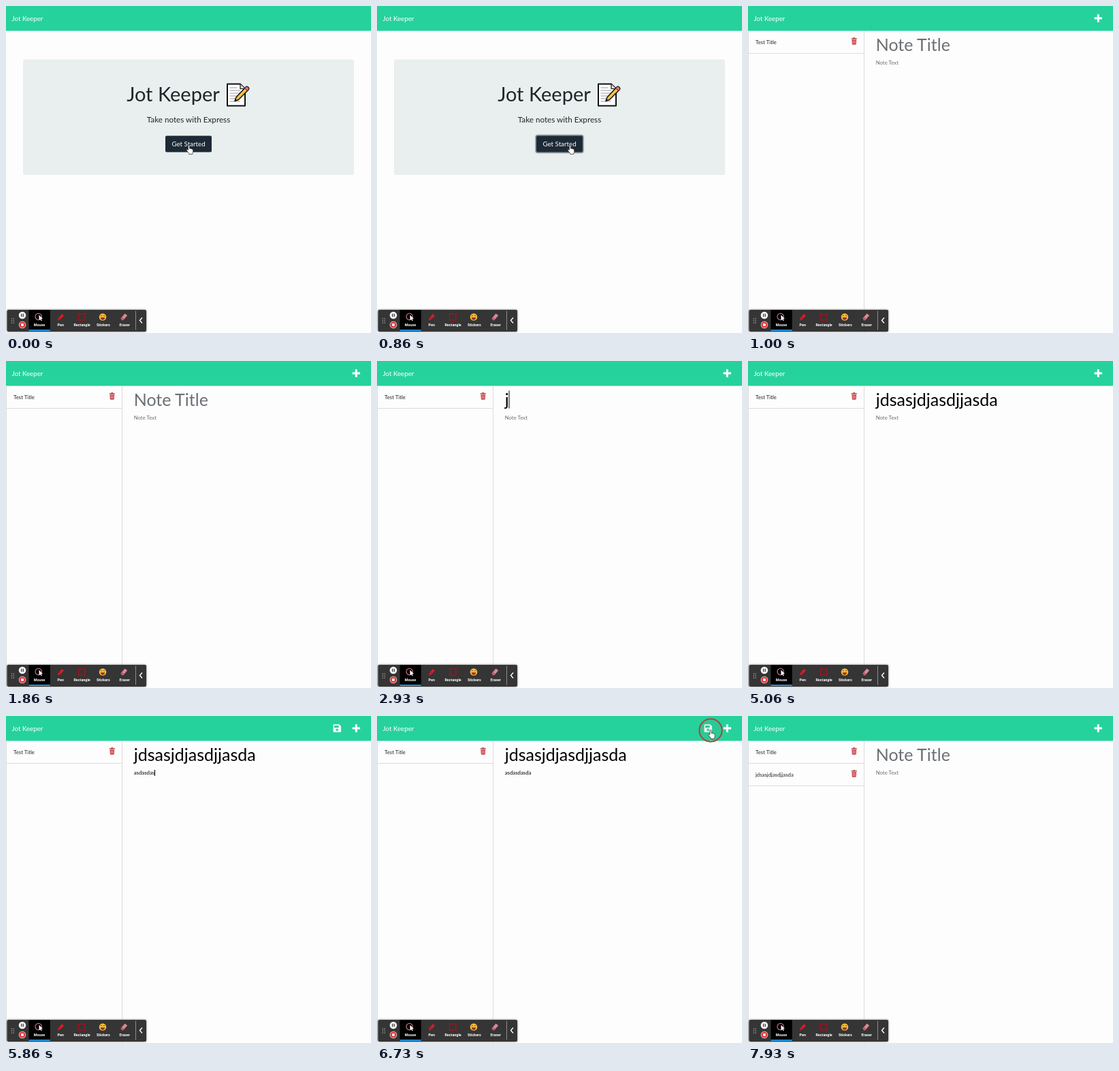
Recreate the animation shown at these times as an HTML page. Size 536x480 px, loop 8 s.

```html
<!DOCTYPE html>
<html lang="en">
<head>
<meta charset="utf-8">
<title>Jot Keeper</title>
<style>
  html, body { margin: 0; width: 100%; height: 100%; overflow: hidden; background: #fdfdfd; }
  svg { display: block; width: 536px; height: 480px; font-family: Lato, sans-serif; }
  .label { font: 700 5.4px Roboto, sans-serif; fill: #fff; text-anchor: middle; }
  .mid { text-anchor: middle; }
  .title { font-size: 25px; }
  .small { font-size: 7.8px; }
</style>
</head>
<body>
<svg viewBox="0 0 536 480">
  <defs>
    <filter id="shadow" x="-10%" y="-30%" width="120%" height="160%">
      <feDropShadow dx="0" dy="0" stdDeviation="1.5" flood-opacity=".55"/>
    </filter>
    <g id="trash" fill="#cb444a">
      <path d="M0 1.3h2.4l.6-1h2.2l.6 1h2.4v1.3h-8.2z" fill="#a8363e"/>
      <path d="M.7 3.2h6.8l-.4 6.6q0 .9-.9.9h-4.2q-.9 0-.9-.9z"/>
      <path d="M2.5 4.6v4.7M4.1 4.6v4.7M5.7 4.6v4.7" stroke="#f2c9cb" stroke-width=".6"/>
    </g>
  </defs>

  <rect width="536" height="480" fill="#fdfdfd"/>
  <rect width="536" height="36.5" fill="#26d29c"/>
  <text x="8.5" y="22" font-size="9.75" fill="#fff">Jot Keeper</text>

  <g id="home">
    <rect x="25" y="78.5" width="486" height="169.5" rx="2.5" fill="#e9eeee"/>
    <g fill="#212529" class="mid">
      <text x="245.5" y="140" font-size="29">Jot Keeper</text>
      <text x="268" y="171" font-size="11.7">Take notes with Express</text>
    </g>
    <g stroke="#111" stroke-linejoin="round">
      <path d="M325 114.500h19l7 7v25h-26z" fill="#fff" stroke-width="2"/>
      <path d="M344 114.500v7h7" fill="#ddd" stroke-width="1.2"/>
      <path d="M328.500 120h11M328.500 124h16M328.500 128h16M328.500 132h12M328.500 136h9M328.500 140h15" stroke="#999" stroke-width="1.1"/>
      <path d="M336 139.500l2-5.500 14-15q1.800-1.500 3.700.300t.300 3.700l-14.500 14.500z" fill="#f5c242" stroke-width="1.500"/>
      <path d="M351.500 119.500q2.200-2.300 4.200-.300t.300 3.800l-1.300 1.400-4.400-3.800z" fill="#e5707c" stroke-width=".8"/>
      <path d="M336 139.500l1-3 2 2z" fill="#222" stroke-width=".5"/>
    </g>
    <rect id="focus" x="233.200" y="189.700" width="69.600" height="25.600" rx="3" fill="none" stroke="#8d969f" stroke-width="2"/>
    <rect x="234" y="190.500" width="68" height="24" rx="2" fill="#1e2936"/>
    <text x="268" y="206" font-size="9.75" fill="#fff" class="mid">Get Started</text>
  </g>

  <g id="notes">
    <path d="M.5 37V480M170.500 37V480M0 69.500H170.500" stroke="#dcdcdc" fill="none"/>
    <text x="11" y="56" class="small" fill="#222">Test Title</text>
    <use href="#trash" x="151.700" y="46"/>
    <g id="saved">
      <path d="M0 102.500H170.500" stroke="#dcdcdc"/>
      <text x="11" y="89" class="small" fill="#222" id="savedTitle"></text>
      <use href="#trash" x="151.700" y="79"/>
    </g>
    <text id="noteTitle" class="title" x="187.700" y="66"></text>
    <text id="noteText" class="small" x="187.700" y="86"></text>
    <path id="caret" stroke="#000" stroke-width="1"/>
    <path d="M514.300 12.300v11.400M508.600 18h11.400" stroke="#fff" stroke-width="3"/>
    <g id="saveIcon">
      <path d="M481.700 12.300h7.500l2.800 2.800v7.500q0 1.200-1.200 1.200h-9.100q-1.200 0-1.200-1.200v-9.100q0-1.200 1.200-1.200z" fill="#f2fbf8"/>
      <path d="M482 14h6.500v3.200H482z" fill="#26d29c"/>
      <circle cx="486.200" cy="20.300" r="1.700" fill="#26d29c"/>
    </g>
  </g>

  <g id="toolbar">
    <rect x="1.500" y="446" width="204.500" height="32" rx="2" fill="#343434" filter="url(#shadow)"/>
    <path d="M8.500 458.500v8M11.300 458.500v8" stroke="#bbb" stroke-width="1.200" stroke-dasharray="1.200 1.800"/>
    <circle cx="24" cy="454" r="5.300" fill="#f5f5f5"/>
    <path d="M22.700 451.700v4.600M25.300 451.700v4.600" stroke="#333" stroke-width="1.200"/>
    <circle cx="24" cy="468" r="5.300" fill="#f5d5d5"/>
    <circle cx="24" cy="468" r="4.600" fill="#d93a3f"/>
    <rect x="22.200" y="466.200" width="3.600" height="3.600" fill="#fff"/>
    <rect x="33.500" y="446" width="31.300" height="31" fill="#000"/>
    <rect x="33.500" y="475" width="31.300" height="2" fill="#2196e8"/>
    <circle cx="47.700" cy="456" r="4.700" fill="none" stroke="#d98088" stroke-width="1.100"/>
    <path d="M48.500 453.500v8l1.900-1.700 1.200 2.500 1.200-.6-1.200-2.400h2.500z" fill="#fff"/>
    <path d="M76 461.500l1.200-4 5-5.500 2.800 2.500-5 5.500z" fill="#d91c2b"/>
    <path d="M78 457l3 2.700" stroke="#821018" stroke-width=".8"/>
    <rect x="106.700" y="452" width="9.200" height="9" fill="none" stroke="#b00d1c" stroke-width="1.300"/>
    <circle cx="142" cy="456.500" r="5.300" fill="#f4bd3c"/>
    <path d="M138.500 455q1.300-1.500 2.500 0M143 455q1.300-1.500 2.500 0" fill="none" stroke="#5b3613" stroke-width=".8"/>
    <path d="M138.700 457.300h6.600q-.6 3.500-3.300 3.500t-3.300-3.500z" fill="#9c2f1d"/>
    <path d="M168.500 458.500l6-7 3.700 2.800-6 7h-2z" fill="#dc8795"/>
    <path d="M168.500 458.500l1.700-2 3.700 2.900-1.700 1.900h-2z" fill="#b85f6e"/>
    <g id="labels"></g>
    <path d="M190.500 447.500v28" stroke="#999" stroke-width=".9"/>
    <path d="M200 457.500l-3.500 4 3.500 4" fill="none" stroke="#fff" stroke-width="1.400"/>
  </g>

  <circle id="ring" r="16.700" fill="#803c32" fill-opacity=".06" stroke="#a34b42" stroke-width="2"/>
  <path id="hand" fill="#fff" stroke="#222" stroke-width=".7" stroke-linejoin="round"
    d="M-1.100 .8q0-1.200 1.100-1.200t1.100 1.200v3.400q1.500-.5 1.900.4 1.400-.3 1.700.6 1.500 0 1.500 1.300v2.300q0 1.400-.9 2.500v1.200h-5v-1l-3.400-4.200q-.7-1 .2-1.500t1.800.7z"/>
  <path id="arrow" fill="#fff" stroke="#222" stroke-width=".7" d="M0 0v10l2.400-2 1.500 3.300 1.500-.7-1.500-3.200h3z"/>
</svg>
<script>
const LOOP = 8000;
const TITLE = "jdsasjdjasdjjasda";
const BODY = "asdasdasda";
const OPEN = 1000, SAVE = 6930;
const titleTyping = { start: 2820, step: 110 };
const bodyTyping = { start: 5160, step: 80 };

// Pointer stops: time, x, y
const pointerPath = [[200, 268.500, 205], [860, 283.500, 205], [6060, 440, 66], [6420, 490, 21], [6980, 490, 21], [7350, 470, 42]];
const clicks = [[260, 640], [2130, 2400], [6460, 6860]];

const $ = id => document.getElementById(id);
const within = (t, a, b) => t >= a && t < b;
const show = (id, on) => $(id).setAttribute("display", on ? "inline" : "none");
const place = (id, [x, y]) => $(id).setAttribute("transform", `translate(${x} ${y})`);

$("labels").innerHTML = ["Mouse", "Pen", "Rectangle", "Stickers", "Eraser"]
  .map((name, i) => `<text class="label" x="${49 + i * 31.3}" y="470">${name}</text>`).join("");
$("savedTitle").textContent = TITLE;

function typed(text, { start, step }, t) {
  return t < SAVE ? text.slice(0, Math.max(0, Math.floor((t - start) / step))) : "";
}

function setField(id, value, placeholder) {
  $(id).textContent = value || placeholder;
  $(id).setAttribute("fill", value ? "#000" : "#6b6f73");
}

function pointerAt(t) {
  const next = pointerPath.findIndex(stop => stop[0] > t);
  if (next === 0) return pointerPath[0].slice(1);
  if (next < 0) return pointerPath.at(-1).slice(1);
  const [t0, x0, y0] = pointerPath[next - 1];
  const [t1, x1, y1] = pointerPath[next];
  const p = (t - t0) / (t1 - t0);
  const ease = p * p * (3 - 2 * p);
  return [x0 + (x1 - x0) * ease, y0 + (y1 - y0) * ease];
}

function drawCaret(t, title, body) {
  const inTitle = within(t, 2400, 5000);
  const inBody = within(t, 5160, 6200);
  const blinkOn = !inTitle || t >= titleTyping.start || t < 2700;
  show("caret", (inTitle || inBody) && blinkOn);
  const field = $(inTitle ? "noteTitle" : "noteText");
  const hasText = inTitle ? title : body;
  const x = 188 + (hasText ? field.getComputedTextLength() : 0);
  $("caret").setAttribute("d", inTitle ? `M${x} 43.500v26` : `M${x} 79v9`);
}

function render(t) {
  const title = typed(TITLE, titleTyping, t);
  const body = typed(BODY, bodyTyping, t);
  show("home", t < OPEN);
  show("notes", t >= OPEN);
  show("focus", within(t, 260, OPEN));
  show("saved", t >= SAVE);
  show("saveIcon", title && body);
  setField("noteTitle", title, "Note Title");
  setField("noteText", body, "Note Text");
  drawCaret(t, title, body);

  const pos = pointerAt(t);
  place("hand", pos);
  place("arrow", pos);
  show("hand", t < OPEN || within(t, 6330, SAVE));
  show("arrow", within(t, 6220, 6330) || within(t, SAVE, 7350));
  place("ring", within(t, 2130, 2400) ? [236, 57] : pos);
  show("ring", clicks.some(([from, to]) => within(t, from, to)));
}

const begin = performance.now();
function tick() {
  render((performance.now() - begin) % LOOP);
  requestAnimationFrame(tick);
}
render(0);
requestAnimationFrame(tick);
</script>
</body>
</html>
```
